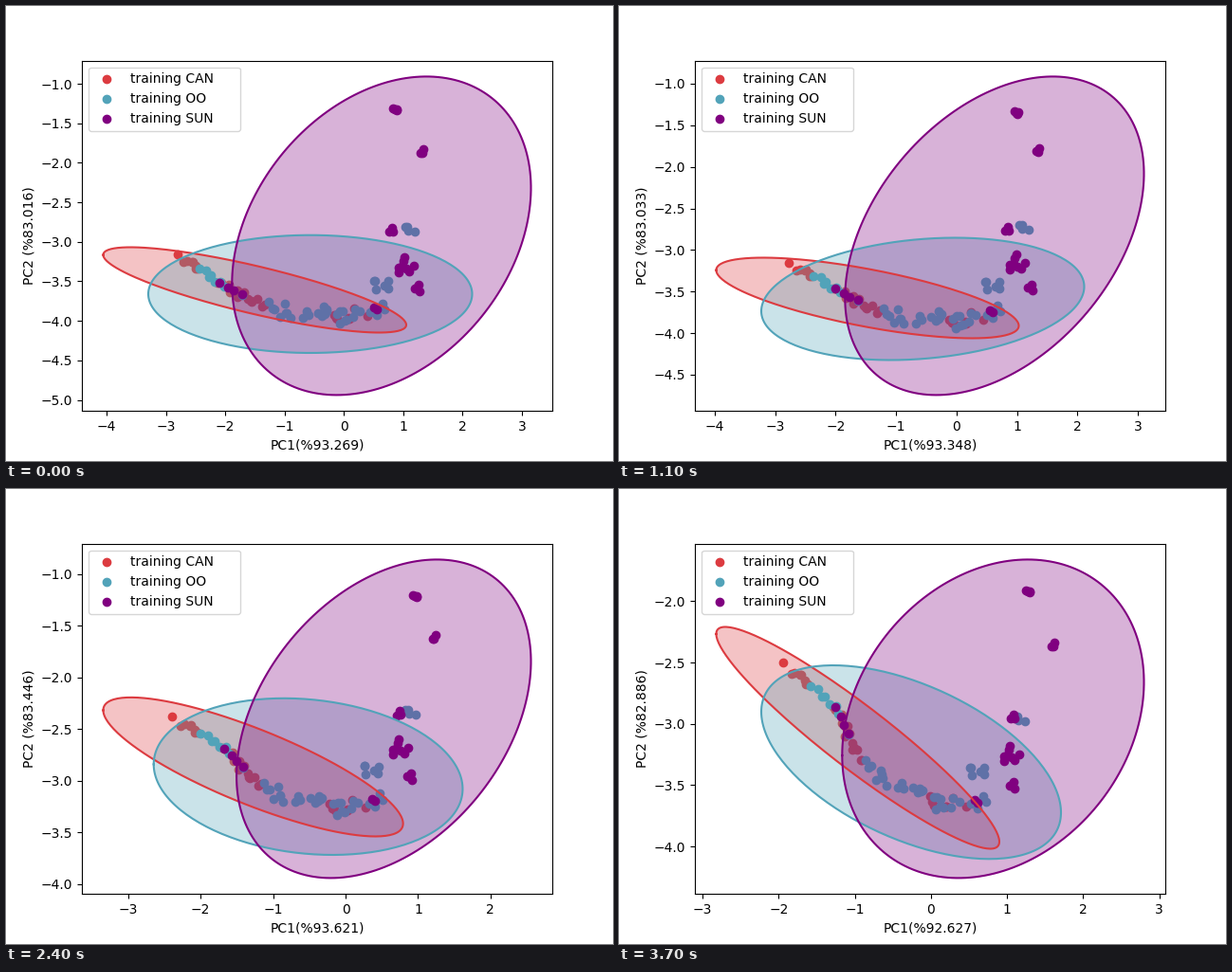
A matplotlib script for the animation above (3800 ms loop, 640 px wide and 480 px high).

```python
import numpy as np
import matplotlib.pyplot as plt
from matplotlib.animation import FuncAnimation

WIDTH, HEIGHT, DPI = 640, 480, 100
FRAMES, INTERVAL = 38, 100

# Outermost ellipse edges on the stage: the axes box less its 5 % margins.
LEFT, RIGHT, TOP, BOTTOM = 102.5, 553.5, 74.4, 410.4

# Key frames of every track, linear in between.
KEYS = [0, 4, 11, 15, 20, 27, 37]

# The samples follow one bent path; its corners in three poses.
PATH_START = [
    (180, 261), (225, 292), (272, 316), (317, 324), (357, 326), (395, 319),
    (395, 293), (433, 296), (422, 272), (425, 238), (405, 236), (437, 153),
    (408, 111),
]
PATH_MIDDLE = [
    (177, 285), (233, 308), (277, 333), (316, 336), (367, 339), (402, 325),
    (390, 294), (433, 294), (418, 265), (428, 233), (412, 233), (445, 149),
    (429, 119),
]
PATH_END = [
    (172, 182), (228, 230), (255, 287), (298, 313), (340, 331), (383, 330),
    (377, 296), (414, 311), (414, 278), (422, 245), (414, 240), (456, 164),
    (429, 110),
]

# Strokes of samples: first and last place on the path, count, spread.
CAN = [(0, 0, 1, 0), (0.2, 0.5, 7, 3), (1, 2, 14, 4), (3.6, 4.5, 7, 6)]
OO = [(0.55, 1.1, 7, 3), (1.5, 1.5, 1, 0), (2.05, 4, 21, 9),
      (3.9, 5.2, 9, 7), (5.95, 6.05, 6, 8), (9, 9, 4, 6)]
SUN = [(1, 1.5, 4, 1), (4.75, 4.9, 2, 4), (7, 7, 4, 5), (8, 8, 8, 9),
       (10, 10, 3, 4), (11, 11, 3, 3), (12, 12, 4, 5)]


def track(frame, *values):
    return np.interp(frame, KEYS, values)


def limits(frame):
    """Axis limits in data units: left, right, bottom, top."""
    return (
        track(frame, -4.416, -4.414, -4.330, -4.229, -3.968, -3.391, -3.100),
        track(frame, 3.512, 3.512, 3.455, 3.344, 3.093, 2.672, 3.081),
        track(frame, -5.140, -5.128, -4.936, -4.494, -4.381, -3.883, -4.388),
        track(frame, -0.707, -0.708, -0.722, -0.822, -0.648, -0.751, -1.529),
    )


def variance(frame):
    return (
        track(frame, 93.269, 93.260, 93.348, 93.441, 93.649, 93.600, 92.627),
        track(frame, 83.016, 83.001, 83.033, 82.727, 83.335, 83.529, 82.886),
    )


# Each outline gives left, right, top, bottom and correlation.
def can_outline(frame):
    return (
        LEFT,
        track(frame, 422, 423, 421.5, 424.5, 431.5, 409, 401),
        track(frame, 254.5, 251, 265.5, 245.5, 279, 175.5, 145.5),
        track(frame, 344.5, 345, 350.5, 358, 356.5, 374, 379.5),
        track(frame, 0.82, 0.82, 0.69, 0.81, 0.655, 0.935, 0.936),
    )


def oo_outline(frame):
    return (
        track(frame, 150, 150.5, 150, 153.5, 160, 152.5, 150),
        track(frame, 491.5, 491.5, 490.5, 490.5, 491, 474.3, 466),
        track(frame, 241.7, 240.5, 244.5, 238.5, 244.5, 203, 186),
        track(frame, 366, 366, 373.5, 376.5, 386, 386, 390.3),
        track(frame, 0, 0.04, -0.2, 0, -0.24, 0.455, 0.52),
    )


def sun_outline(frame):
    return (
        track(frame, 238.3, 239, 238.3, 241.7, 246.7, 240.3, 235.3),
        RIGHT, TOP, BOTTOM,
        track(frame, -0.3, -0.29, -0.39, -0.37, -0.5, -0.255, -0.23),
    )


def path(frame):
    """Corners of the sample path, mixed from the three poses."""
    to_middle = track(frame, 0, 0, 0.4, 0.45, 1, 0.23, 0)
    to_end = track(frame, 0, 0.04, 0, 0.12, 0, 0.77, 1)
    start, middle, end = map(np.array, (PATH_START, PATH_MIDDLE, PATH_END))
    return start + to_middle * (middle - start) + to_end * (end - start)


def ellipse(left, right, top, bottom, corr):
    """Outline that starts and ends at the leftmost point."""
    t = np.linspace(0, 2 * np.pi, 200)
    x = (left + right) / 2 - (right - left) / 2 * np.cos(t)
    wave = corr * np.cos(t) + np.sqrt(1 - corr ** 2) * np.sin(t)
    return x, (top + bottom) / 2 - (bottom - top) / 2 * wave


class Group:
    def __init__(self, stage, label, color, strokes, outline, seed):
        rng = np.random.default_rng(seed)
        self.places = np.concatenate(
            [np.linspace(first, last, n) for first, last, n, _ in strokes])
        self.jitter = np.concatenate(
            [rng.uniform(-spread, spread, (n, 2)) for *_, n, spread in strokes])
        self.outline = outline
        self.dots = stage.scatter([], [], color=color, label=label)
        self.area, = stage.fill([0, 1, 1], [0, 0, 1], facecolor=color,
                                edgecolor="none", alpha=0.3)
        self.edge, = stage.plot([], [], color=color, lw=1.5)

    def update(self, frame):
        corners = path(frame)
        steps = np.arange(len(corners))
        on_path = [np.interp(self.places, steps, axis) for axis in corners.T]
        self.dots.set_offsets(np.column_stack(on_path) + self.jitter + 0.5)
        x, y = ellipse(*self.outline(frame))
        self.area.set_xy(np.column_stack([x, y]))
        self.edge.set_data(x, y)


fig = plt.figure(figsize=(WIDTH / DPI, HEIGHT / DPI), dpi=DPI)

# The samples live on a pixel stage beneath the labelled axes.
stage = fig.add_axes([0, 0, 1, 1], xlim=(0, WIDTH), ylim=(HEIGHT, 0))
stage.axis("off")
ax = fig.add_subplot()
ax.patch.set_visible(False)

groups = [
    Group(stage, "training CAN", "#dc3b40", CAN, can_outline, 1),
    Group(stage, "training OO", "#52a3b9", OO, oo_outline, 2),
    Group(stage, "training SUN", "purple", SUN, sun_outline, 3),
]
ax.legend(handles=[g.dots for g in groups], loc="upper left",
          bbox_to_anchor=(0, 0, 0.351, 1), mode="expand")


def update(frame):
    left, right, bottom, top = limits(frame)
    ax.set(xlim=(left, right), ylim=(bottom, top))
    first, second = variance(frame)
    ax.set_xlabel(f"PC1(%{first:.3f})")
    ax.set_ylabel(f"PC2 (%{second:.3f})")
    for group in groups:
        group.update(frame)


anim = FuncAnimation(fig, update, frames=FRAMES, interval=INTERVAL,
                     init_func=lambda: update(0), repeat=True, repeat_delay=0)
plt.show()
```
